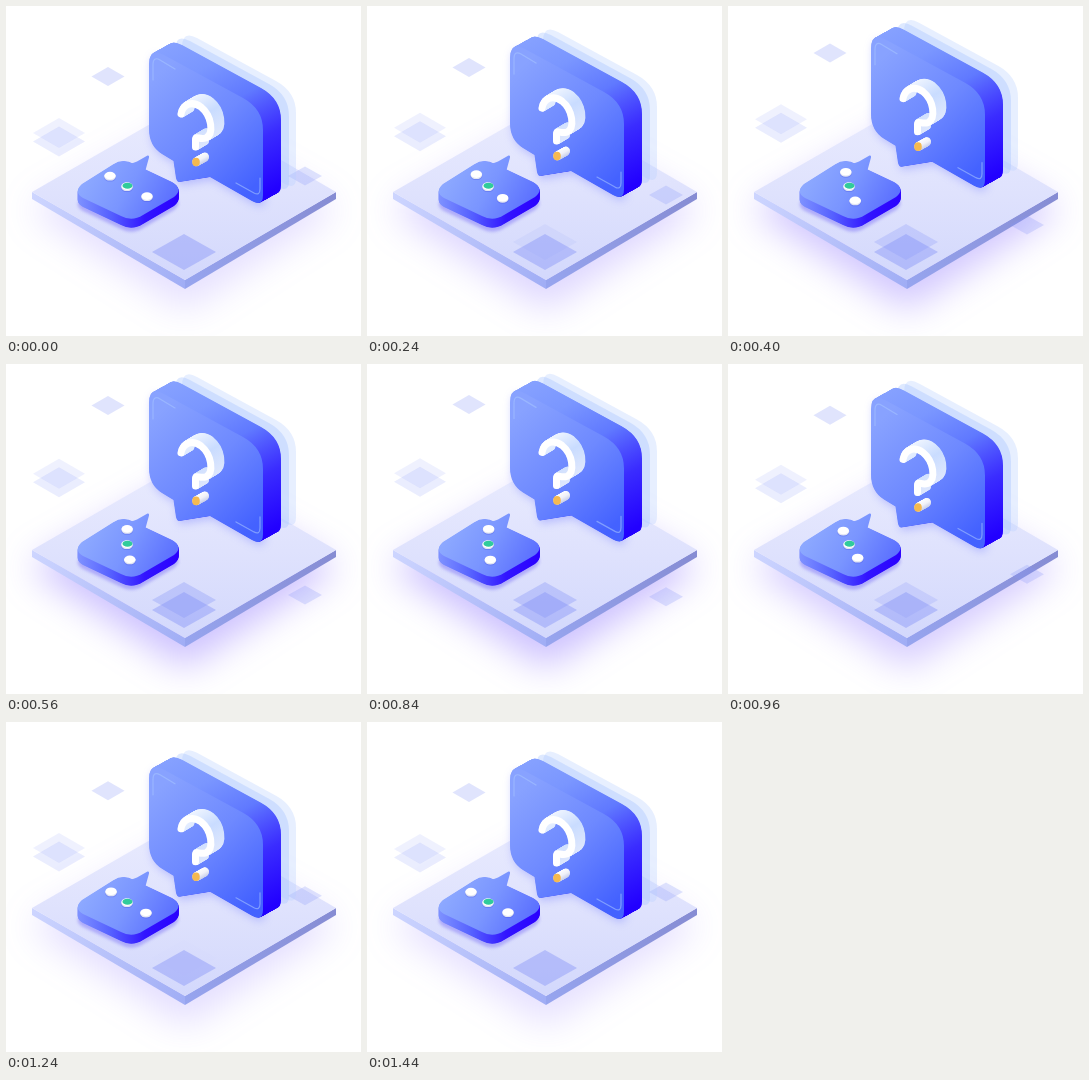
An HTML page with a canvas that plays this animation: 355x330 px, repeating every 3640 ms.

```html
<!DOCTYPE html>
<html lang="en">
<head>
<meta charset="utf-8">
<title>Question and answer</title>
<style>
html, body { margin: 0; width: 100%; height: 100%; overflow: hidden; background: #fff; }
canvas { display: block; }
</style>
</head>
<body>
<canvas id="stage" width="355" height="330"></canvas>
<script>
const ctx = document.getElementById('stage').getContext('2d');
const LOOP = 3640, STEP = 40, MOVE = 600, RISE = 120, FALL = 820;

const panel = new Path2D('M143 58Q143 41 158 49L237 92Q257 103 257 124V189Q257 201 246 195L204 171L173 176Q171 176 170 172L167.5 155L156 148Q143 140 143 123Z');
const brackets = new Path2D('M147 74V59Q147 50 154 54L169 63M254 172V183Q254 190 248 187L230 177');
const hook = new Path2D('M175 108C177 97 187 95 195 101C206 110 208 128 200 132C193 134 189.5 129 189.5 134V141');
const dotBody = new Path2D('M190 151.5a4 4.5 0 1 0 .01 0Z');
const chat = new Path2D('M76 178L107 158.5Q117 152 128 158L166 176Q178 183 168 191L137 209Q126 216 115 210L77 192Q67 186 76 178Z');
const chatTail = new Path2D('M114 159Q125 158 131 155.5L141.5 149.5Q143.5 149 143 151.5L139 166Z');

function gradient(x0, y0, x1, y1, ...colors) {
  const g = ctx.createLinearGradient(x0, y0, x1, y1);
  colors.forEach((c, i) => g.addColorStop(i / (colors.length - 1), c));
  return g;
}

const paint = {
  floor: gradient(179, 100, 179, 274, '#e9ebfe', '#dfe2fd', '#d3d8fc'),
  floorLeft: gradient(26, 190, 179, 280, '#cdd5ff', '#a0adf5'),
  floorRight: gradient(179, 280, 330, 190, '#97a5ef', '#868cd3'),
  panel: gradient(148, 72, 248, 180, '#88a2ff', '#6e89ff', '#4462ff'),
  panelSide: gradient(143, 45, 257, 190, '#87a2ff', '#7a96ff', '#6079ff', '#3a2cff', '#2200ff'),
  hookSide: gradient(172, 98, 206, 138, '#f4f8ff', '#c9dcff', '#e2e9fc'),
  dotSide: gradient(187, 152, 193, 161, '#ffffff', '#f0f1f8', '#bcc4e6'),
  chat: gradient(85, 162, 158, 206, '#8da9ff', '#7a95ff', '#5c71ff'),
  chatSide: gradient(71, 190, 173, 190, '#7f93ff', '#5560ff', '#3214ff', '#2a00ff')
};

function ease(x) {
  let lo = 0, hi = 1;
  for (let i = 0; i < 24; i++) {
    const s = (lo + hi) / 2;
    if (0.75 * s * (1 - s) + s ** 3 < x) lo = s; else hi = s;
  }
  return 0.3 * (1 - lo) ** 2 * lo + 3 * (1 - lo) * lo ** 2 + lo ** 3;
}

const part = (t, start) => ease(Math.min(1, Math.max(0, (t - start) / MOVE)));

function shifted(dx, dy, draw) {
  ctx.save();
  ctx.translate(dx, dy);
  draw();
  ctx.restore();
}

function fill(path, color) {
  ctx.fillStyle = color;
  ctx.fill(path);
}

function stroke(path, color, width) {
  ctx.strokeStyle = color;
  ctx.lineWidth = width;
  ctx.stroke(path);
}

function blurred(radius, draw) {
  ctx.filter = `blur(${radius}px)`;
  draw();
  ctx.filter = 'none';
}

// Repeats a shape from its far end to its front.
function extrude(dx, dy, draw) {
  const n = 2 * Math.ceil(Math.hypot(dx, dy));
  for (let i = n; i > 0; i--) shifted(dx * i / n, dy * i / n, draw);
}

function poly(color, ...pts) {
  ctx.beginPath();
  for (let i = 0; i < pts.length; i += 2) ctx.lineTo(pts[i], pts[i + 1]);
  ctx.fillStyle = color;
  ctx.fill();
}

function diamond(x, y, w, h, alpha) {
  poly(`rgba(132,146,246,${alpha})`, x - w, y, x, y - h, x + w, y, x, y + h);
}

function oval(x, y, rx, ry, color) {
  ctx.beginPath();
  ctx.ellipse(x, y, rx, ry, 0, 0, 2 * Math.PI);
  ctx.fillStyle = color;
  ctx.fill();
}

function drawFloor(p) {
  const glow = `rgba(125,95,255,${0.2 + 0.2 * p})`;
  blurred(18, () => poly(glow, 24, 204, 179, 118, 332, 204, 179, 304));
  poly(paint.floorLeft, 26, 186, 179, 274, 179, 283, 26, 193);
  poly(paint.floorRight, 330, 186, 179, 274, 179, 283, 330, 193);
  poly(paint.floor, 26, 186, 179, 98, 330, 186, 179, 274);
}

function drawPanel() {
  shifted(33, -17, () => fill(panel, 'rgba(180,205,255,.32)'));
  shifted(26, -14, () => fill(panel, 'rgba(165,194,255,.36)'));
  blurred(4, () => shifted(2, 3, () => fill(panel, 'rgba(100,110,255,.35)')));
  extrude(18, -10, () => fill(panel, paint.panelSide));
  fill(panel, paint.panel);
  stroke(brackets, 'rgba(165,195,255,.6)', 1.2);

  extrude(10, -6, () => stroke(hook, paint.hookSide, 7));
  stroke(hook, '#fff', 7);
  extrude(9, -5, () => fill(dotBody, paint.dotSide));
  oval(190, 156, 3.8, 4.3, '#f5b950');
}

function drawButton(x, y, color) {
  oval(x, y + 1.6, 6, 4, 'rgba(70,80,220,.3)');
  oval(x, y + 0.6, 5.8, 4, '#e2e5f2');
  oval(x, y - 0.4, 5.6, 3.8, '#fff');
  if (color) oval(x + 0.5, y - 0.8, 5, 3, color);
}

function drawChat(p) {
  blurred(1.5, () => shifted(0, 13, () => fill(chat, 'rgba(120,110,245,.45)')));
  extrude(0, 9, () => fill(chat, paint.chatSide));
  fill(chat, paint.chat);
  fill(chatTail, paint.chat);
  drawButton(104 + 18 * p, 170 - 5 * p);
  drawButton(121, 180.5, '#30cb9b');
  drawButton(141 - 18 * p, 190.5 + 5.5 * p);
}

function draw(t) {
  const p = part(t, RISE) - part(t, FALL);
  ctx.clearRect(0, 0, 355, 330);
  ctx.lineCap = ctx.lineJoin = 'round';
  drawFloor(p);
  diamond(102, 70.5 - 30.5 * p, 16.5, 9.5, 0.25);
  diamond(53, 127 - 18 * p, 26, 15, 0.13);
  diamond(53, 135.5 - 18 * p, 26, 15, 0.17);
  diamond(299, 170 + 64 * p, 17, 9.5, 0.25);
  diamond(178, 246, 32, 18, 0.43);
  diamond(178, 236, 32, 18, 0.35 * p);
  shifted(0, -20 * p, drawPanel);
  drawChat(p);
}

const start = performance.now();
function tick() {
  const t = (performance.now() - start) % LOOP;
  draw(Math.floor(t / STEP) * STEP);
  requestAnimationFrame(tick);
}
tick();
</script>
</body>
</html>
```
